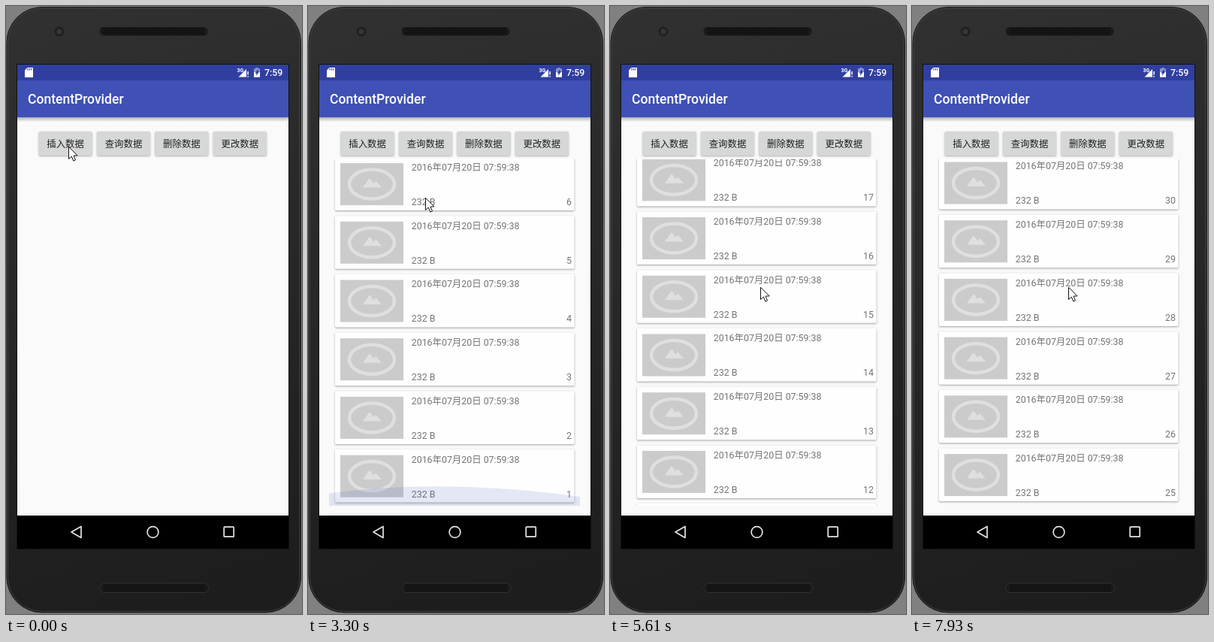
Write an HTML page with a canvas that moves like this. It is 394x809 px and loops after 8000 ms.

```html
<!DOCTYPE html>
<html lang="zh">
<head>
<meta charset="utf-8">
<style>
html, body { margin: 0; width: 100%; height: 100%; overflow: hidden; background: #808080; }
canvas { display: block; width: 394px; height: 809px; }
</style>
</head>
<body>
<canvas id="stage"></canvas>
<script>
const W = 394, H = 809, LOOP = 8000;
const SCREEN = { x: 15, y: 78, w: 361, bar: 99, body: 148.2, nav: 678, end: 722 };
const LIST = { x: 28, y: 204, w: 334, h: 461 };
const PITCH = 77.7, FIRST_MOVE = 1948, STEP = 89;
const FONT = 'Roboto, "Noto Sans CJK SC", "Noto Sans CJK", sans-serif';
const canvas = document.getElementById('stage');
const ctx = canvas.getContext('2d');
const ratio = window.devicePixelRatio || 1;
canvas.width = W * ratio;
canvas.height = H * ratio;

// Turning points of the swiping cursor
const START = [83, 187], DEEP = [177, 598], LEFT = [155, 235];
const HIGH = [217, 235], LOW = [177, 565], END = [196, 565];
const SWIPES = [
  [1870, START], [2780, DEEP], [3385, LEFT], [4170, LOW], [4693, HIGH],
  [5190, LOW], [5948, HIGH], [6970, LOW], [7406, HIGH], [8550, END]
];
const SCROLL = [[3385, [0]], [4272, [428]], [5607, [849]], [7031, [1528]], [8000, [1893]]];

const clamp = u => Math.min(1, Math.max(0, u));
const linear = u => u;
const smooth = u => (1 - Math.cos(Math.PI * u)) / 2;

function along(points, t, ease) {
  const next = Math.max(1, points.findIndex(p => p[0] > t));
  const [t0, a] = points[next - 1], [t1, b] = points[next];
  const u = ease(clamp((t - t0) / (t1 - t0)));
  return a.map((v, i) => v + (b[i] - v) * u);
}

function rect(x, y, w, h, fill) {
  ctx.fillStyle = fill;
  ctx.fillRect(x, y, w, h);
}

function paint(fill, stroke, width = 1) {
  if (fill) { ctx.fillStyle = fill; ctx.fill(); }
  if (stroke) { ctx.strokeStyle = stroke; ctx.lineWidth = width; ctx.stroke(); }
}

function round(x, y, w, h, r, ...style) {
  ctx.beginPath();
  ctx.roundRect(x, y, w, h, r);
  paint(...style);
}

function circle(x, y, r, ...style) {
  ctx.beginPath();
  ctx.arc(x, y, r, 0, 2 * Math.PI);
  paint(...style);
}

function poly(points, ...style) {
  ctx.beginPath();
  points.forEach(([x, y]) => ctx.lineTo(x, y));
  ctx.closePath();
  paint(...style);
}

const shift = (points, x, y) => points.map(([dx, dy]) => [x + dx, y + dy]);

function text(str, x, y, size, fill, weight = 400, align = 'left') {
  ctx.font = `${weight} ${size}px ${FONT}`;
  ctx.textAlign = align;
  ctx.fillStyle = fill;
  ctx.fillText(str, x, y);
}

function withShadow(alpha, blur, draw) {
  ctx.save();
  ctx.shadowColor = `rgba(0,0,0,${alpha})`;
  ctx.shadowBlur = blur * ratio;
  ctx.shadowOffsetY = ratio;
  draw();
  ctx.restore();
}

function gradient(x0, y0, x1, y1, from, to) {
  const g = ctx.createLinearGradient(x0, y0, x1, y1);
  g.addColorStop(0, from);
  g.addColorStop(1, to);
  return g;
}

function drawSpeaker(x, y) {
  round(x, y, 145, 12.5, 6, '#1a1a1a', '#303030');
  for (let row = 0; row < 4; row++) {
    for (let dx = 5 + row % 2 * 1.5; dx < 140; dx += 3) {
      rect(x + dx, y + 1.8 + row * 2.5, 1.5, 1.5, '#080808');
    }
  }
}

function drawPhone() {
  rect(0, 0, W, H, '#808080');
  round(1, 1.5, 391.5, 805.5, 47, gradient(0, 0, 220, H, '#313131', '#1d1d1d'), '#1a1a1a');
  round(2.5, 3, 388.5, 802.5, 45, null, '#404040');
  drawSpeaker(124, 27.5);
  drawSpeaker(125, 768);
  circle(71, 34, 6.5, '#202020');
  circle(71, 34, 3.5, '#34363b');
  rect(14, 77, 363, 646, '#111');
}

function drawStatus() {
  rect(SCREEN.x, SCREEN.y, SCREEN.w, 21, '#303f9f');
  poly([[28.5, 82], [36, 82], [36, 95], [25, 95], [25, 85.5]], '#fff');
  for (let i = 0; i < 3; i++) rect(28.5 + i * 2.3, 83, 1.1, 2.5, '#303f9f');
  text('3G', 307.5, 87.5, 7, '#fff', 700);
  poly([[320, 84], [320, 94.5], [309.5, 94.5]], '#fff');
  rect(321.3, 87, 1.5, 4.5, '#fff');
  rect(321.3, 93, 1.5, 1.5, '#fff');
  rect(332.5, 82, 3, 2, '#8c95ca');
  rect(330, 83.3, 8, 5, '#8c95ca');
  rect(330, 88, 8, 6.7, '#fff');
  poly([[335, 84.5], [331.5, 89.5], [333.5, 89.5], [333, 93], [336.6, 88]], '#303f9f');
  text('7:59', 344, 93, 12.3, '#fff', 500);
}

function drawNav() {
  rect(SCREEN.x, SCREEN.nav, SCREEN.w, SCREEN.end - SCREEN.nav, '#000');
  ctx.lineJoin = 'round';
  poly([[87, 700], [100, 692.5], [100, 707.5]], null, '#e4e4e4', 1.7);
  circle(195.5, 700, 7.4, null, '#e4e4e4', 1.7);
  round(290.2, 693.2, 13, 13, 0.8, null, '#e4e4e4', 1.7);
  ctx.lineJoin = 'miter';
}

function drawToolbar() {
  const { x, w, bar, body } = SCREEN;
  rect(x, body, w, 6, gradient(0, body, 0, body + 6, 'rgba(0,0,0,.28)', 'rgba(0,0,0,0)'));
  rect(x, bar, w, body - bar, '#3f51b5');
  text('ContentProvider', 29, 130, 17.55, '#fff', 500);
}

function drawButtons(pressed) {
  ['插入数据', '查询数据', '删除数据', '更改数据'].forEach((label, i) => {
    const x = 43.6 + i * 77.4, down = pressed && i === 0;
    withShadow(0.3, down ? 4 : 2.5, () =>
      round(x, 167, 71, 32, 2, down ? '#c6c7c7' : '#d6d7d7'));
    text(label, x + 35.5, 187.6, 12.4, '#212121', 400, 'center');
  });
}

function drawThumb(x, y) {
  rect(x, y, 84, 56, '#cbcbcb');
  ctx.beginPath();
  ctx.ellipse(x + 42, y + 28, 30, 19.5, 0, 0, 2 * Math.PI);
  paint(null, '#dfdfdf', 4.5);
  const hills = [[30, 32.5], [38, 21], [40, 21], [44, 27], [46.5, 24.5], [48, 24.5], [55, 32.5]];
  poly(shift(hills, x, y), '#dfdfdf');
}

function drawCard(n, top) {
  const label = (str, x, dy, align) => text(str, x, top + dy, 12.4, '#747474', 400, align);
  withShadow(0.36, 2.5, () => round(36, top, 318.5, 70.5, 1.5, '#fefefe'));
  drawThumb(43, top + 7.5);
  label('2016年07月20日 07:59:38', 137.7, 17.4);
  label('232 B', 137.7, 63.4);
  label(n, 351, 63.4, 'right');
}

function drawGlow(amount) {
  const right = LIST.x + LIST.w, bottom = LIST.y + LIST.h;
  const level = h => bottom - h * amount;
  ctx.beginPath();
  ctx.moveTo(LIST.x, bottom);
  ctx.lineTo(LIST.x, level(16.5));
  ctx.quadraticCurveTo(180, level(37), right, level(12));
  ctx.lineTo(right, bottom);
  paint(`rgba(63,81,181,${0.135 * amount})`);
}

function drawList(scroll, glow) {
  ctx.save();
  ctx.beginPath();
  ctx.rect(LIST.x, LIST.y, LIST.w, LIST.h);
  ctx.clip();
  const lowest = Math.max(1, Math.floor(scroll / PITCH));
  for (let n = lowest; n < lowest + 8; n++) {
    const top = 201.6 + (6 - n) * PITCH + scroll;
    if (top > LIST.y - 75) drawCard(n, top);
  }
  drawGlow(glow);
  ctx.restore();
}

function drawCursor(x, y) {
  const arrow = [[0, 0], [0, 16.2], [3.8, 12.8], [6.3, 18.8], [9, 17.7], [6.5, 11.8], [11.6, 11.6]];
  poly(shift(arrow, Math.round(x) + 0.5, Math.round(y) + 0.3), '#fff', '#111');
}

function draw(t) {
  const pose = t < FIRST_MOVE ? 0 : FIRST_MOVE + 10 + Math.floor((t - FIRST_MOVE) / STEP) * STEP;
  const [scroll] = along(SCROLL, Math.min(pose, LOOP - 1), linear);
  const glow = clamp(Math.min((pose - 2850) / 440, (3650 - pose) / 357));
  ctx.setTransform(ratio, 0, 0, ratio, 0, 0);
  drawPhone();
  rect(SCREEN.x, SCREEN.bar, SCREEN.w, SCREEN.nav - SCREEN.bar, '#fafafa');
  drawToolbar();
  drawStatus();
  drawButtons(t >= 500 && t < 600);
  if (t >= 1420) drawList(scroll, glow);
  drawNav();
  drawCursor(...along(SWIPES, pose, smooth));
}

const start = performance.now();
function tick() {
  draw((performance.now() - start) % LOOP);
  requestAnimationFrame(tick);
}
tick();
</script>
</body>
</html>
```
